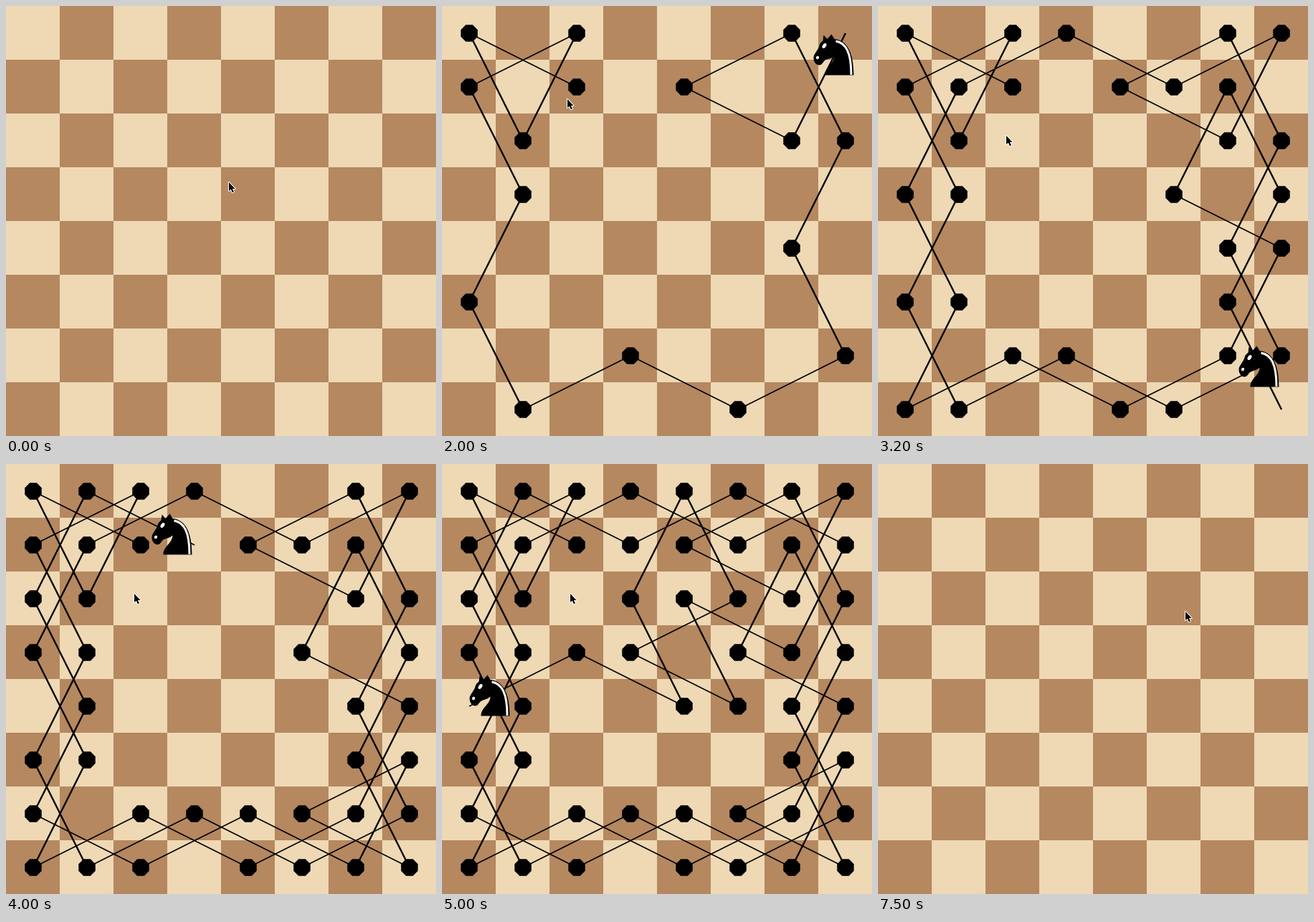
Animation of 600 by 600 pixels, one loop 8000 ms. Source, as an HTML page with a canvas:

```html
<!DOCTYPE html>
<html>
<head>
<meta charset="utf-8">
<title>Knight's tour</title>
<style>
  html, body { margin: 0; overflow: hidden; }
  canvas { display: block; }
</style>
</head>
<body>
<canvas id="stage" width="600" height="600"></canvas>
<script>
const ctx = document.getElementById('stage').getContext('2d');
const CELL = 75, LOOP = 8000, STEP = 100;
const START = 900, CLEAR = 6500;

// Knight moves, rightward ones first, each half from top to bottom.
const moves = [];
for (const side of [1, -1])
  for (const dy of [-2, -1, 1, 2]) moves.push([side * (3 - Math.abs(dy)), dy]);

const exits = ([x, y]) => moves
  .map(([dx, dy]) => [x + dx, y + dy])
  .filter(([c, r]) => c >= 0 && c < 8 && r >= 0 && r < 8);

// Depth-first search that tries the squares with the fewest exits first.
function findTour(path, seen) {
  if (path.length === 64) return path;
  const next = exits(path[path.length - 1])
    .filter(s => !seen.has(String(s)))
    .sort((a, b) => exits(a).length - exits(b).length);
  for (const square of next) {
    const found = findTour([...path, square], new Set(seen).add(String(square)));
    if (found) return found;
  }
  return null;
}

const tour = findTour([[2, 1]], new Set(['2,1'])).map(s => s.map(n => n * CELL + 38));

// [time, moves made]
const pace = [[900, 1], [2000, 15.8], [3200, 30.6], [4000, 40.8], [5000, 52.8], [5900, 63]];

// [time, x, y]
const pointer = [[0, 311, 246], [600, 175, 130], [2100, 175, 130], [2500, 179, 181],
  [6500, 179, 181], [6800, 299, 206], [7100, 299, 206], [7500, 429, 206]];

const horse = new Path2D('M-14-27L-9-21.5L-3-28L1-21.5C18-20 28-4 28 29' +
  'H-12C-12 17 1 13 1 2C-4 7-10 6-13 9L-17 14L-20 15C-24 15-28 11-28 5' +
  'C-28-1-22-5-20-12C-19-16-17-17-15-19Z');
const mane = new Path2D('M3-18.5C17-16 24.5-3 24.5 28.5');
const arrow = new Path2D('M0 0V12L2.8 9.7L4.9 14.3L6.9 13.4L4.9 8.9H8.6Z');

const smooth = k => k * k * (3 - 2 * k);
const mix = (a, b, k) => a.map((v, i) => v + (b[i] - v) * k);

function sample(keys, t, ease = k => k) {
  const next = keys.findIndex(k => k[0] > t);
  if (next < 0) return keys[keys.length - 1].slice(1);
  const [from, ...a] = keys[next - 1], [to, ...b] = keys[next];
  return mix(a, b, ease((t - from) / (to - from)));
}

function at(x, y, draw) {
  ctx.save();
  ctx.translate(x, y);
  draw();
  ctx.restore();
}

function drawBoard() {
  for (let i = 0; i < 64; i++) {
    const col = i % 8, row = i >> 3;
    ctx.fillStyle = (col + row) % 2 ? '#b58860' : '#eed9b4';
    ctx.fillRect(col * CELL, row * CELL, CELL, CELL);
  }
}

function drawLine([x1, y1], [x2, y2]) {
  const steep = Math.abs(y2 - y1) > Math.abs(x2 - x1);
  ctx.lineWidth = steep ? 2.4 : 1.7;
  ctx.beginPath();
  ctx.moveTo(x1, y1);
  ctx.lineTo(x2, y2);
  ctx.stroke();
}

function drawDot([x, y]) {
  ctx.beginPath();
  for (let i = 0; i < 8; i++) {
    const a = (i + 0.5) * Math.PI / 4;
    ctx.lineTo(x + 12.7 * Math.cos(a), y + 12.7 * Math.sin(a));
  }
  ctx.fill();
}

function drawSpot(x, y, rx, ry) {
  ctx.beginPath();
  ctx.ellipse(x, y, rx, ry, 0.6, 0, 7);
  ctx.fill();
}

function drawKnight() {
  ctx.fillStyle = '#000';
  ctx.fill(horse);
  ctx.strokeStyle = ctx.fillStyle = '#fff';
  ctx.lineWidth = 2.9;
  ctx.stroke(mane);
  drawSpot(-13, -12, 2.4, 3.8);
  drawSpot(-22.5, 4.5, 2, 2.3);
}

function drawTour(t) {
  const [made] = sample(pace, t);
  const from = Math.floor(made), to = Math.ceil(made);
  ctx.strokeStyle = ctx.fillStyle = '#000';
  for (let i = 0; i < to; i++) {
    drawLine(tour[i], tour[i + 1]);
    drawDot(tour[i]);
  }
  const [x, y] = mix(tour[from], tour[to], made - from);
  at(x - 1.5, y - 0.5, drawKnight);
}

function drawArrow() {
  ctx.lineJoin = 'round';
  ctx.lineWidth = 2;
  ctx.strokeStyle = '#fff';
  ctx.stroke(arrow);
  ctx.fillStyle = '#000';
  ctx.fill(arrow);
}

function frame() {
  const t = Math.floor(performance.now() % LOOP / STEP) * STEP;
  drawBoard();
  if (t >= START && t < CLEAR) drawTour(t);
  const [x, y] = sample(pointer, t, smooth);
  at(x, y, drawArrow);
  requestAnimationFrame(frame);
}
frame();
</script>
</body>
</html>
```
